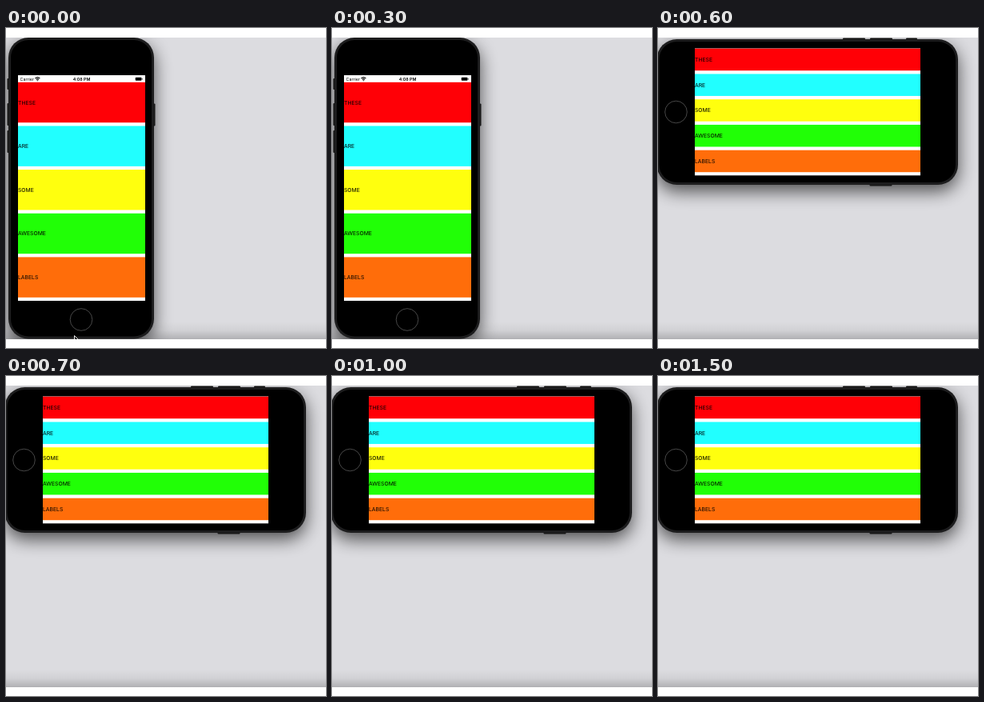
These frames come from a looping animation (400 px wide and 400 px high, 1.6 s). An HTML page:

```html
<!DOCTYPE html>
<html lang="en">
<head>
<meta charset="utf-8">
<title>Rotating phone</title>
<style>
  html, body { margin: 0; width: 100%; height: 100%; overflow: hidden; background: #fff; }
  svg { display: block; width: 100vw; height: 100vh; }
  text { font-family: Inter, Roboto, sans-serif; fill: #000; }
  .label { font-size: 6.8px; }
  .status { font-size: 5.3px; }
  .time { font-weight: 600; text-anchor: middle; }
  .portrait, .landscape, .cursor { animation: 1.6s step-end infinite; }
  .portrait { animation-name: portrait; }
  .landscape { animation-name: landscape; }
  .cursor { animation-name: cursor; }
  @keyframes portrait { 0% { opacity: 1 } 37.5%, 100% { opacity: 0 } }
  @keyframes landscape { 0% { opacity: 0 } 37.5%, 100% { opacity: 1 } }
  @keyframes cursor {
    0% { transform: translate(85px, 384px); opacity: 1 }
    6.25% { transform: translate(85px, 384px); opacity: 0 }
    50% { transform: translate(368px, 26px); opacity: 1 }
    62.5%, 100% { transform: translate(368px, 26px); opacity: 0 }
  }
</style>
</head>
<body>
<svg viewBox="0 0 400 400">
  <defs>
    <clipPath id="desk"><rect y="12" width="400" height="377"/></clipPath>
    <filter id="blur" x="-30%" y="-30%" width="160%" height="160%"><feGaussianBlur stdDeviation="11"/></filter>
    <linearGradient id="fade" x1="0" y1="0" x2="0" y2="1">
      <stop offset="0" stop-opacity="0"/>
      <stop offset=".5" stop-opacity=".05"/>
      <stop offset="1" stop-opacity=".2"/>
    </linearGradient>
    <g id="shell">
      <g fill="#171717">
        <rect x="1.5" y="63" width="4" height="14" rx="1"/>
        <rect x="1.5" y="94" width="4" height="28" rx="1"/>
        <rect x="1.5" y="128" width="4" height="28" rx="1"/>
        <rect x="183" y="94.5" width="3.5" height="28" rx="1"/>
      </g>
      <rect x="3" y="12" width="182" height="376.5" rx="25" fill="#1d1d1e"/>
      <rect x="6" y="15" width="176" height="370.5" rx="22"/>
      <circle cx="94" cy="364.5" r="13.8" fill="none" stroke="#5a5a5a" stroke-width=".8"/>
    </g>
  </defs>
  <rect width="400" height="400" fill="#fff"/>
  <g clip-path="url(#desk)">
    <rect y="12" width="400" height="377" fill="#dcdce0"/>
    <rect y="367" width="400" height="22" fill="url(#fade)"/>

    <g class="portrait">
      <rect x="3" y="20" width="182" height="376.5" rx="25" opacity=".65" filter="url(#blur)"/>
      <use href="#shell"/>
      <rect x="15" y="59" width="159" height="282" fill="#fff"/>
      <text class="status" x="17.6" y="65.7">Carrier</text>
      <text class="status time" x="94.5" y="65.7">4:08 PM</text>
      <g fill="none" stroke="#000" stroke-width="1.1">
        <path d="M36.4 63.1Q39.4 60.3 42.4 63.1M37.7 64.4Q39.4 62.9 41.1 64.4"/>
      </g>
      <path d="M38.3 65.2H40.5L39.4 66.4Z"/>
      <rect x="161.7" y="61.8" width="7.8" height="4" rx="1"/>
      <rect x="169.9" y="63.1" width=".7" height="1.4"/>
      <g id="tall"></g>
    </g>

    <g class="landscape">
      <rect x="-1.5" y="22" width="376.5" height="182" rx="25" opacity=".65" filter="url(#blur)"/>
      <use href="#shell" transform="translate(387 11) rotate(90)"/>
      <rect x="46" y="25.5" width="282" height="158.8" fill="#fff"/>
      <g id="wide"></g>
    </g>

    <path class="cursor" d="M.5 .5V9.6L2.6 7.7L4.1 11L5.7 10.3L4.2 7.1H7Z"
      fill="#000" stroke="#fff" stroke-width=".9" stroke-linejoin="round"/>
  </g>
</svg>
<script>
  const rows = [
    ['THESE', '#ff0006'],
    ['ARE', '#21ffff'],
    ['SOME', '#ffff0e'],
    ['AWESOME', '#21ff06'],
    ['LABELS', '#ff6d0a']
  ];

  function stack(id, x, y, width, height, step) {
    document.getElementById(id).innerHTML = rows.map(([word, color], i) => {
      const top = y + i * step;
      return `<rect x="${x}" y="${top}" width="${width}" height="${height}" fill="${color}"/>` +
        `<text class="label" x="${x}" y="${top + height / 2 + 2.5}">${word}</text>`;
    }).join('');
  }

  stack('tall', 15, 67.8, 159, 50.4, 54.65);
  stack('wide', 46, 25.7, 282, 27.5, 31.75);
</script>
</body>
</html>
```
